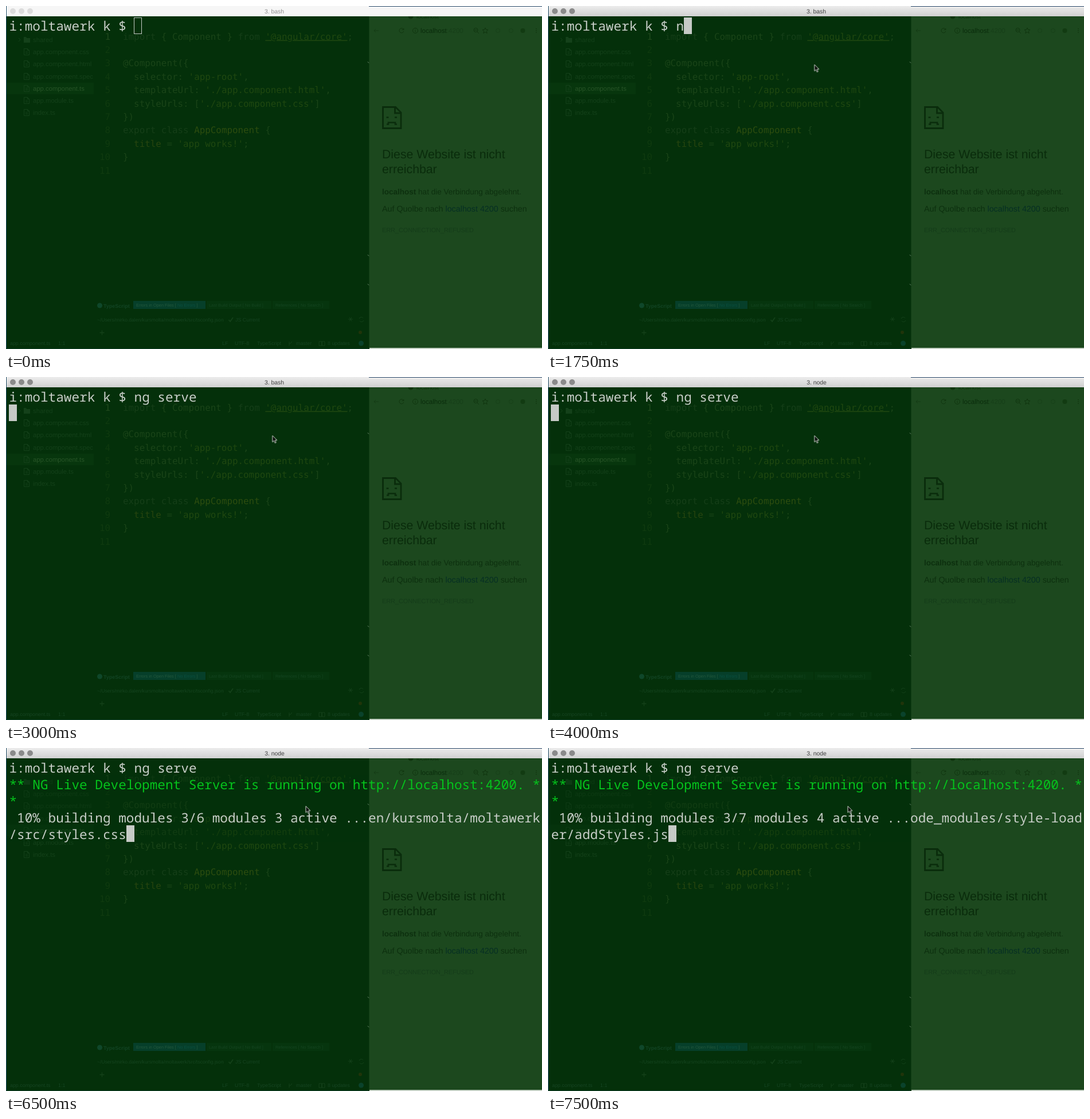
These frames come from a looping animation (935 px wide and 599 px high, 8 s). An HTML page:

```html
<!DOCTYPE html>
<html lang="de">
<head>
<meta charset="utf-8">
<title>ng serve</title>
<style>
html, body { margin: 0; width: 100%; height: 100%; overflow: hidden; background: #04300a; }
svg { display: block; width: 100vw; height: 100vh; }
text { white-space: pre; text-rendering: geometricPrecision; }
.ui { font-family: "Liberation Sans", Arial, sans-serif; }
.code { font: 15.87px "DejaVu Sans Mono", monospace; fill: #1a4418; }
.num { fill: #0f3a0f; text-anchor: end; }
.kw { fill: #153e18; }
.str { fill: #1f4710; }
.cls { fill: #2c4c0f; }
.side { font-size: 11.3px; fill: #14411a; }
.small { font-size: 8.9px; fill: #164422; }
.tab { font-size: 7.4px; fill: #154521; }
.page { font-size: 13.53px; fill: #0d300f; }
.line { fill: none; stroke: #14411a; }
.dark { fill: none; stroke: #10350f; }
.term { font: 22.71px "Noto Sans Mono", monospace; fill: #c8cec8; }
.ok { fill: #05c31c; }
.title { font-size: 10.4px; text-anchor: middle; }

.at750, .at1750, .at2000, .at2250, .at2500, .at4000, .at6500, .at7000,
.to4000, .mid, .pointer, .cursor {
  animation: 8s step-end infinite;
}
.at750 { animation-name: at750; }
.at1750 { animation-name: at1750; }
.at2000 { animation-name: at2000; }
.at2250 { animation-name: at2250; }
.at2500 { animation-name: at2500; }
.at4000 { animation-name: at4000; }
.at6500 { animation-name: at6500; }
.at7000 { animation-name: at7000; }
.to4000 { animation-name: to4000; }
.mid { animation-name: mid; }
.pointer { animation-name: pointer; }
.cursor { animation-name: cursor; }
@keyframes at750 { 0% { opacity: 0 } 9.375% { opacity: 1 } }
@keyframes at1750 { 0% { opacity: 0 } 21.875% { opacity: 1 } }
@keyframes at2000 { 0% { opacity: 0 } 25% { opacity: 1 } }
@keyframes at2250 { 0% { opacity: 0 } 28.125% { opacity: 1 } }
@keyframes at2500 { 0% { opacity: 0 } 31.25% { opacity: 1 } }
@keyframes at4000 { 0% { opacity: 0 } 50% { opacity: 1 } }
@keyframes at6500 { 0% { opacity: 0 } 81.25% { opacity: 1 } }
@keyframes at7000 { 0% { opacity: 0 } 87.5% { opacity: 1 } }
@keyframes to4000 { 0% { opacity: 1 } 50%, 100% { opacity: 0 } }
@keyframes mid { 0% { opacity: 0 } 81.25% { opacity: 1 } 87.5%, 100% { opacity: 0 } }
@keyframes pointer {
  0% { opacity: 0; transform: translate(464.8px, 102.3px) }
  3.125% { opacity: 1; transform: translate(464.8px, 102.3px) }
  71.875% { opacity: 1; transform: translate(475.8px, 101.8px) }
  75%, 100% { opacity: 1; transform: translate(523px, 101.5px) }
}
@keyframes cursor {
  0% { fill: transparent; transform: translate(223px, 20px) }
  9.375% { fill: #c6cac6; transform: translate(223px, 20px) }
  21.875% { fill: #c6cac6; transform: translate(237px, 20px) }
  25% { fill: #c6cac6; transform: translate(278px, 20px) }
  28.125% { fill: #c6cac6; transform: translate(305px, 20px) }
  31.25% { fill: #c6cac6; transform: translate(332px, 20px) }
  37.5% { fill: #c6cac6; transform: translate(5px, 48px) }
  81.25%, 100% { fill: #c6cac6; transform: translate(210px, 135px) }
}
</style>
</head>
<body>
<svg viewBox="0 0 935 599" preserveAspectRatio="none">
  <defs>
    <linearGradient id="bar" x2="0" y2="1">
      <stop offset="0" stop-color="#ececec"/>
      <stop offset="1" stop-color="#d0d0d0"/>
    </linearGradient>
    <clipPath id="tree"><path d="M0 18H153V599H0z"/></clipPath>
    <clipPath id="body"><path d="M0 18H935V599H0z"/></clipPath>
    <g id="file" class="line"><path d="M.5.5h6l3 3v8h-9zM6.5.5v3h3M3 6h4M3 8.500h4"/></g>
    <g id="dots"><circle cx="12" cy="9" r="5"/><circle cx="27" cy="9" r="5"/><circle cx="42" cy="9" r="5"/></g>
  </defs>

  <rect width="935" height="599" fill="#04300a"/>
  <rect x="633.5" width="302" height="599" fill="#1c481e"/>

  <!-- file tree -->
  <g class="ui side" clip-path="url(#tree)">
    <rect x="1" y="134" width="152" height="20" fill="#07360d"/>
    <path d="M22 56l3 3-3 3" class="line"/>
    <path d="M31 54h4l1 2h6v8H31z"/>
    <text x="47" y="63">shared</text>
    <text x="47" y="84">app.component.css</text>
    <text x="47" y="105">app.component.html</text>
    <text x="47" y="127">app.component.spec.ts</text>
    <text x="47" y="148" fill="#275427">app.component.ts</text>
    <text x="47" y="169">app.module.ts</text>
    <text x="47" y="190">index.ts</text>
    <use href="#file" x="31" y="74"/>
    <use href="#file" x="31" y="95"/>
    <use href="#file" x="31" y="117"/>
    <use href="#file" x="31" y="138"/>
    <use href="#file" x="31" y="159"/>
    <use href="#file" x="31" y="180"/>
  </g>

  <!-- editor -->
  <g class="code">
    <g class="num">
      <text x="182" y="58.500" fill="#1f471c">1</text>
      <text x="182" y="82">2</text>
      <text x="182" y="105.400">3</text>
      <text x="182" y="128.800">4</text>
      <text x="182" y="152.200">5</text>
      <text x="182" y="175.600">6</text>
      <text x="182" y="199">7</text>
      <text x="182" y="222.400">8</text>
      <text x="182" y="245.800">9</text>
      <text x="182" y="269.200">10</text>
      <text x="182" y="292.600">11</text>
    </g>
    <text x="204" y="58.500"><tspan class="kw">import</tspan> { Component } <tspan class="kw">from</tspan> <tspan class="str" text-decoration="underline">'@angular/core'</tspan>;</text>
    <text x="204" y="105.400">@Component({</text>
    <text x="204" y="128.800">  selector: <tspan class="str">'app-root'</tspan>,</text>
    <text x="204" y="152.200">  templateUrl: <tspan class="str">'./app.component.html'</tspan>,</text>
    <text x="204" y="175.600">  styleUrls: [<tspan class="str">'./app.component.css'</tspan>]</text>
    <text x="204" y="199">})</text>
    <text x="204" y="222.400"><tspan class="kw">export class</tspan> <tspan class="cls">AppComponent</tspan> {</text>
    <text x="204" y="245.800">  <tspan fill="#27450f">title</tspan> = <tspan class="str">'app works!'</tspan>;</text>
    <text x="204" y="269.200">}</text>
  </g>

  <!-- build panel and status bar -->
  <g class="ui">
    <circle cx="163.500" cy="523" r="4.500" fill="#0f472a"/>
    <text x="170" y="526.500" font-size="9" font-weight="bold" fill="#124424">TypeScript</text>
    <rect x="222" y="515" width="126" height="14" fill="#063f2a"/>
    <rect x="350" y="515" width="113" height="14" fill="#06350e"/>
    <rect x="465" y="515" width="99" height="14" fill="#06350e"/>
    <g class="tab">
      <text x="227" y="525" fill="#24593e">Errors in Open Files [ <tspan fill="#0a5040">No Errors</tspan> ]</text>
      <text x="354" y="525">Last Build Output [ No Build ]</text>
      <text x="470" y="525">References [ No Search ]</text>
    </g>
    <text x="159" y="551" font-size="8.56" fill="#164520">~/Users/mirko.dalen/kursmolta/moltawerk/src/tsconfig.json</text>
    <path d="M388.500 548l2.500 3 5-7" class="line" stroke-width="1.800"/>
    <text x="400" y="551" class="small">JS Current</text>
    <path d="M597 547h8M599 543.500l4 7M603 543.500l-4 7M616 546a4 4 0 0 1 7-1M624 549a4 4 0 0 1-7 1" class="line"/>
    <path d="M163.500 570.500h8M167.500 566.500v8" class="line" stroke-width="1.300"/>
    <circle cx="618" cy="570" r="3" fill="#20340a"/>
    <g class="small">
      <text x="7" y="592">app.component.ts</text>
      <text x="91" y="592">1:1</text>
      <text x="377" y="592">LF</text>
      <text x="399" y="592">UTF-8</text>
      <text x="438" y="592">TypeScript</text>
      <text x="506" y="592">master</text>
      <text x="561" y="592">8 updates</text>
    </g>
    <path d="M494 586v7M498.500 586q0 3-4.500 4M546 586h5v7h-5zM551 586h5v7h-5z" class="line"/>
    <circle cx="619.500" cy="589" r="4.500" fill="#0a422b"/>
  </g>

  <!-- browser page -->
  <g class="ui" clip-path="url(#body)">
    <circle cx="706" cy="18" r="4.500" fill="#10350f"/>
    <text x="716" y="21.500" font-size="9.800" fill="#10350f">localhost</text>
    <g class="dark">
      <path d="M650 43h-8m3-3l-3 3 3 3" opacity=".6"/>
      <path d="M693.500 41a4 4 0 1 0 .3 3m0-5v2.500h-3"/>
      <path d="M714 42v3.500M714 40v1"/><circle cx="714" cy="43" r="4.500"/>
      <circle cx="819.500" cy="42" r="3.500"/><path d="M822 45l3 3M817.500 42h4"/>
      <path d="M836 38l1.400 3.200 3.600.3-2.700 2.500.9 3.500-3.200-1.900-3.200 1.900.9-3.500-2.700-2.500 3.600-.3z"/>
      <circle cx="858" cy="43" r="3.500" opacity=".35"/><circle cx="881" cy="43" r="3.500" opacity=".35"/>
    </g>
    <circle cx="901.500" cy="43" r="4" fill="#123b12"/>
    <path d="M925 39v8" stroke="#10350f" stroke-width="1.500" stroke-dasharray="1.500 1.700"/>
    <text x="723" y="46.800" font-size="11.600" fill="#0a2c0c">localhost<tspan fill="#173f19">:4200</tspan></text>

    <g fill="none" stroke="#0a2c0c" stroke-width="2.800">
      <path d="M657.500 176.500H679.500L689 186V213.500H657.500z"/>
      <path d="M678.500 176V187H690"/>
      <path d="M663.500 194.500h4M678 194.500h4M664 206.500h3v-3h12v3h3" stroke-width="2.600"/>
    </g>
    <g font-size="21.260" fill="#0a2c0c">
      <text x="656" y="265.500">Diese Website ist nicht</text>
      <text x="656" y="292">erreichbar</text>
    </g>
    <text x="656" y="328.500" class="page"><tspan font-weight="bold">localhost</tspan> hat die Verbindung abgelehnt.</text>
    <text x="656" y="359" font-size="14.300" fill="#0d300f">Auf Quolbe nach <tspan fill="#062f24">localhost 4200</tspan> suchen</text>
    <text x="656" y="394.500" font-size="10.870" fill="#153c1a">ERR_CONNECTION_REFUSED</text>
  </g>

  <rect class="at6500" x="1" y="48" width="632" height="116" fill="#04300a" fill-opacity=".4"/>

  <!-- title bar -->
  <g class="ui title">
    <rect width="935" height="18" fill="#f6f6f6"/>
    <use href="#dots" fill="#dcdcdc"/>
    <text x="468" y="13" fill="#8f8f8f">3. bash</text>
    <g class="at750">
      <rect width="935" height="18" fill="url(#bar)"/>
      <use href="#dots" fill="#8a8a8a"/>
      <text class="to4000" x="468" y="13" fill="#404040">3. bash</text>
      <text class="at4000" x="468.500" y="13" fill="#404040">3. node</text>
    </g>
  </g>

  <!-- window edges -->
  <path d="M631 97.500l2 2M631 434.500l2 2M631 485.500l2 2" stroke="#7d967e"/>
  <path d="M.5 0V599" stroke="#23506a"/>
  <path d="M633 .5H935" stroke="#2b4a6c"/>
  <path d="M634 598H935" stroke="#c6d2c6" stroke-width="2"/>
  <path d="M0 598.500H633" stroke="#0c3a24"/>

  <!-- terminal -->
  <g class="term">
    <text x="5.500" y="43.300">i:moltawerk k $ </text>
    <text class="at1750" x="223.500" y="43.300">n</text>
    <text class="at2000" x="237.130" y="43.300">g s</text>
    <text class="at2250" x="278" y="43.300">er</text>
    <text class="at2500" x="305.270" y="43.300">ve</text>
    <g class="at6500">
      <text class="ok" x="5.500" y="72.100">** NG Live Development Server is running on http://localhost:4200. *</text>
      <text class="ok" x="5.500" y="100.900">*</text>
    </g>
    <g class="mid">
      <text x="5.500" y="129.700"> 10% building modules 3/6 modules 3 active ...en/kursmolta/moltawerk</text>
      <text x="5.500" y="158.500">/src/styles.css</text>
    </g>
    <g class="at7000">
      <text x="5.500" y="129.700"> 10% building modules 3/7 modules 4 active ...ode_modules/style-load</text>
      <text x="5.500" y="158.500">er/addStyles.js</text>
    </g>
  </g>
  <rect class="cursor" x=".5" y=".5" width="13" height="28" fill="transparent" stroke="#c6cac6"/>

  <path class="pointer" d="M0 0V11.300L2.600 8.900 4.400 13 6.300 12.200 4.500 8.100H8z" fill="#0a0f0a" stroke="#d4dad4" stroke-width="1"/>
</svg>
</body>
</html>
```
